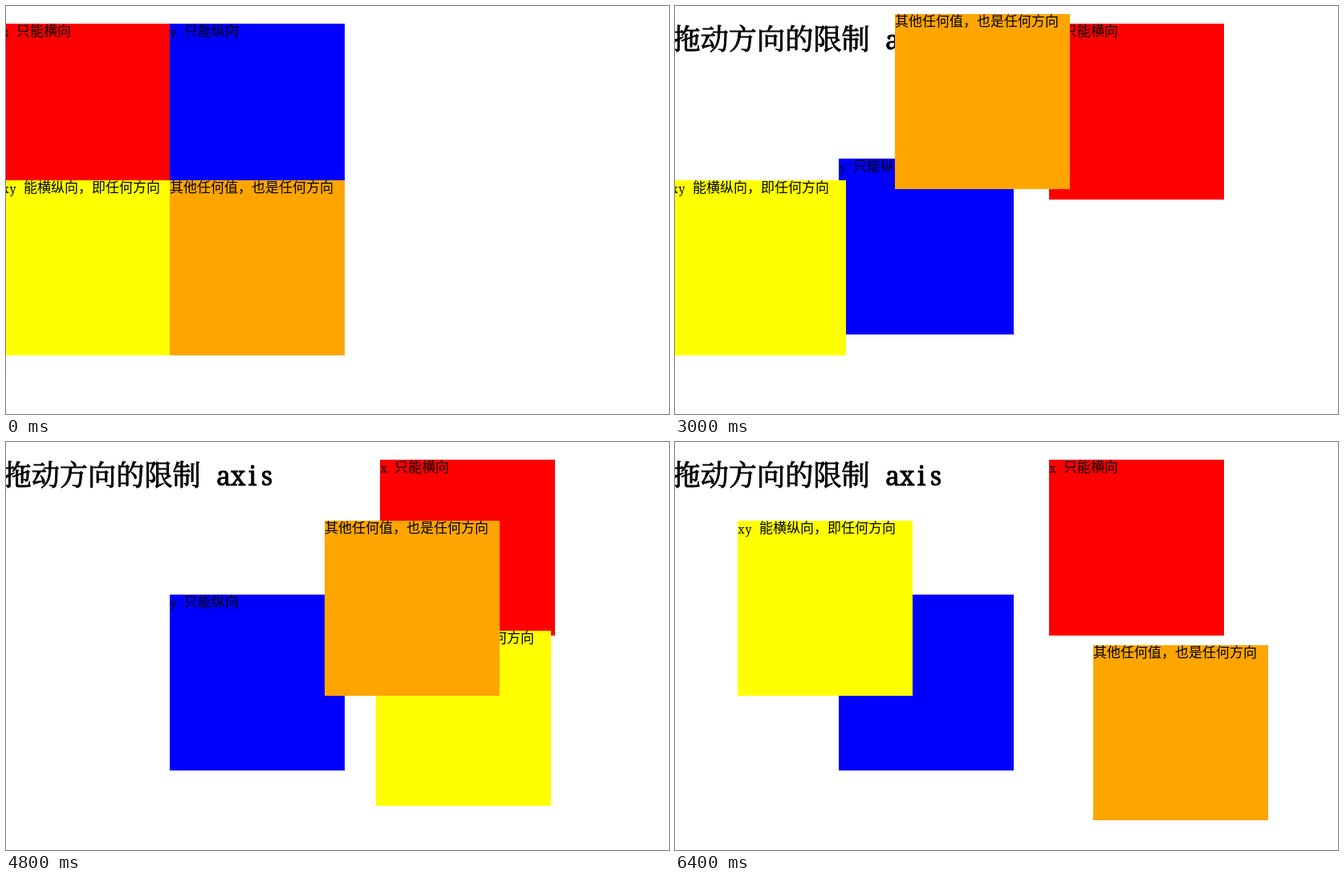
An HTML page with a canvas for the animation above (7400 ms loop, 826 by 508 pixels).

```html
<!DOCTYPE html>
<html lang="zh">
<head>
<meta charset="utf-8">
<style>
  html, body { margin: 0; height: 100%; overflow: hidden; background: #fff; }
  canvas { display: block; }
</style>
</head>
<body>
<canvas id="stage" width="826" height="508"></canvas>
<script>
const ctx = document.getElementById('stage').getContext('2d');
const LOOP = 7400, STEP = 100, SIZE = 218;
const HAN = '"Noto Sans CJK SC", "Noto Sans CJK", sans-serif';
const LATIN = '"Noto Serif", serif';

// Boxes from back to front; keys hold [time, x, y] at the turns of each drag.
const boxes = [
  { color: '#f00', latin: 'x', han: '只能横向', height: SIZE + 1,
    keys: [[800, -5, 22], [1200, 466, 22]] },
  { color: '#00f', latin: 'y', han: '只能纵向', height: SIZE + 1,
    keys: [[1600, 204, 22], [1900, 204, 300], [2000, 204, 300],
      [2300, 204, -31], [2500, 204, 190]] },
  { color: '#ff0', latin: 'xy', han: '能横纵向，即任何方向', height: SIZE,
    keys: [[4000, -5, 217], [4200, 230, 268], [4300, 415, 191], [4400, 511, 150],
      [4600, 300, 25], [4800, 461, 235], [5100, 26, 21], [5200, 79, 107], [5400, 78, 98]] },
  { color: '#ffa500', latin: '', han: '其他任何值，也是任何方向', height: SIZE,
    keys: [[2700, 204, 217], [2900, 428, 40], [3100, 120, -20], [3300, 0, 295],
      [3400, 170, 242], [3500, 132, 131], [3600, 397, 98], [5600, 397, 98],
      [5900, 174, 240], [6300, 601, 286], [6400, 521, 253]] }
];

function position(keys, t) {
  const next = keys.findIndex(key => key[0] > t);
  if (next === 0) return keys[0].slice(1);
  if (next < 0) return keys.at(-1).slice(1);
  const [t0, x0, y0] = keys[next - 1], [t1, x1, y1] = keys[next];
  const k = (t - t0) / (t1 - t0);
  return [x0 + (x1 - x0) * k, y0 + (y1 - y0) * k].map(Math.round);
}

// Fixed-pitch Latin letters, with an optional outline for weight.
function writeMono(text, x, y, pitch, size, bold) {
  ctx.font = `${size}px ${LATIN}`;
  ctx.textAlign = 'center';
  [...text].forEach((ch, i) => write(ch, x + (i + 0.5) * pitch, y, bold));
}

function writeHan(text, x, y, font, bold) {
  ctx.font = font;
  ctx.textAlign = 'left';
  write(text, x, y, bold);
}

function write(text, x, y, bold) {
  ctx.fillText(text, x, y);
  if (bold) ctx.strokeText(text, x, y);
}

function drawBox({ color, latin, han, height, keys }, t) {
  const [x, y] = position(keys, t);
  ctx.fillStyle = color;
  ctx.fillRect(x, y, SIZE, height);
  ctx.fillStyle = '#000';
  const indent = latin && (latin.length + 1) * 9;
  writeMono(latin, x, y + 16, 9, 14);
  writeHan(han, x + Number(indent), y + 15, '300 17px ' + HAN);
}

function drawTitle() {
  ctx.fillStyle = ctx.strokeStyle = '#000';
  ctx.lineWidth = 0.9;
  writeHan('拖动方向的限制', -3.5, 54, '35.2px "Noto Serif CJK SC", ' + HAN, true);
  writeMono('axis', 262, 54, 18, 32, true);
}

function draw(now) {
  const t = Math.floor(now % LOOP / STEP) * STEP;
  ctx.fillStyle = '#fff';
  ctx.fillRect(0, 0, 826, 508);
  drawTitle();
  boxes.forEach(box => drawBox(box, t));
}

const begin = performance.now();
function tick() {
  draw(performance.now() - begin);
  requestAnimationFrame(tick);
}
tick();
</script>
</body>
</html>
```
